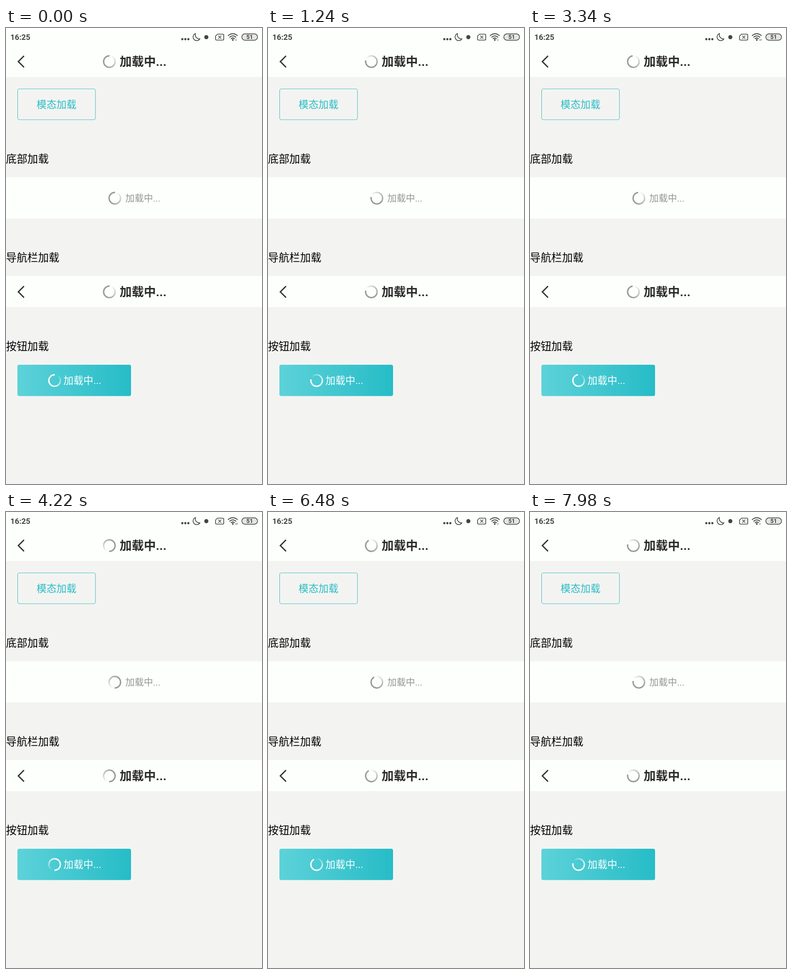
Write an HTML page that moves like this. It is 561 px wide and 998 px high and loops after 8000 ms.

```html
<!DOCTYPE html>
<html lang="zh-CN">
<head>
<meta charset="utf-8">
<title>加载</title>
<style>
  html, body { margin: 0; width: 100%; height: 100%; overflow: hidden; background: #f3f4f2; }
  #stage { position: absolute; left: 0; top: 0; width: 561px; height: 998px; }
  svg { position: absolute; left: 0; top: 0; }
  text { font-family: Roboto, "Noto Sans CJK SC", "Noto Sans CJK JP", sans-serif; }
  .line { fill: none; stroke: #444; stroke-width: 1.6; stroke-linecap: round; stroke-linejoin: round; }
  .panel { fill: #fdfffc; }
  .back { fill: none; stroke: #333; stroke-width: 2.8; }
  .heading { font-size: 26.5px; font-weight: 700; fill: #2b2b2b; }
  .label { font-size: 23.4px; }
  .button { font-size: 21.8px; }
  .ring {
    position: absolute; width: 29px; height: 29px; margin: -14.5px; border-radius: 50%;
    --ink: 154, 156, 154;
    background: conic-gradient(rgba(var(--ink), 0) 15deg, rgba(var(--ink), .6) 115deg,
      rgba(var(--ink), 1) 210deg, rgba(var(--ink), 1) 358deg, rgba(var(--ink), 0) 360deg);
    -webkit-mask: radial-gradient(circle, transparent 10.6px, #000 11.4px, #000 13.9px, transparent 14.5px);
    mask: radial-gradient(circle, transparent 10.6px, #000 11.4px, #000 13.9px, transparent 14.5px);
  }
  .ring.light { --ink: 255, 255, 255; }
</style>
</head>
<body>
<div id="stage">
  <svg width="561" height="998" viewBox="0 0 561 998">
    <defs>
      <linearGradient id="teal">
        <stop offset="0" stop-color="#5dd2d9"/>
        <stop offset="1" stop-color="#26bcc7"/>
      </linearGradient>
      <g id="nav">
        <path class="back" d="M39.5 61 L27 73.5 L39.5 86"/>
        <text class="heading" x="249" y="82.5">加载中...</text>
      </g>
    </defs>

    <rect width="561" height="998" fill="#f3f4f2"/>
    <rect class="panel" width="561" height="107"/>
    <rect class="panel" y="326.5" width="561" height="90.5"/>
    <rect class="panel" y="543" width="561" height="68"/>

    <!-- status bar -->
    <text x="9.5" y="26" font-size="17" font-weight="700" fill="#444">16:25</text>
    <g fill="#444">
      <circle cx="386.4" cy="24.5" r="2.4"/>
      <circle cx="393" cy="24.5" r="2.4"/>
      <circle cx="399.6" cy="24.5" r="2.4"/>
      <circle cx="439" cy="20" r="4.5"/>
    </g>
    <path class="line" d="M415.5 12 A8 8 0 1 0 425 23.5 A8.5 8.5 0 0 1 415.5 12 Z"/>
    <path class="line" d="M463.5 13.5 H475 Q477.2 13.5 477.2 15.7 V24.3 Q477.2 26.5 475 26.5 H461.5 Q459.3 26.5 459.3 24.3 V17.5 Z
      M465.8 17.3 l5.4 5.4 m0 -5.4 l-5.4 5.4"/>
    <g class="line" stroke-width="2" style="stroke-width:2">
      <path d="M487 16.5 Q497 8.5 507 16.5 M490.3 20 Q497 14.5 503.7 20 M493.4 23.3 Q497 20.5 500.6 23.3"/>
    </g>
    <circle cx="497" cy="26" r="1.9" fill="#444"/>
    <path d="M504 24 v4 m-1 -1.2 l1 1.2" fill="none" stroke="#555" stroke-width=".9"/>
    <path id="upload" d="M506.6 28 v-4 m1 1.2 l-1 -1.2" fill="none" stroke="#555" stroke-width=".9"/>
    <rect x="516.8" y="12.8" width="34.4" height="14" rx="7" fill="#e4e5e3" stroke="#444" stroke-width="1.5"/>
    <text x="534" y="24.4" font-size="12.5" font-weight="700" fill="#444" text-anchor="middle">51</text>

    <use href="#nav"/>
    <use href="#nav" y="504"/>

    <rect x="25.5" y="133.2" width="170.5" height="67.5" rx="4" fill="none" stroke="#52bcc3" stroke-width="1.1"/>
    <text class="button" x="110.7" y="174.5" fill="#2bbcc4" text-anchor="middle">模态加载</text>

    <text class="label" x="0" y="295.3">底部加载</text>
    <text class="label" x="0" y="511.3">导航栏加载</text>
    <text class="label" x="0" y="705.3">按钮加载</text>

    <text x="261.5" y="380.2" font-size="20.26" fill="#959795">加载中...</text>

    <rect x="25" y="737" width="249" height="68.5" rx="4" fill="url(#teal)"/>
    <text class="button" x="126" y="778.7" fill="#fff">加载中...</text>
  </svg>

  <div class="ring" style="left:226px;top:73px"></div>
  <div class="ring" style="left:238.3px;top:372px"></div>
  <div class="ring" style="left:226px;top:577px"></div>
  <div class="ring light" style="left:106px;top:771px"></div>
</div>
<script>
  const LOOP = 8000, BEAT = 840, STEPS = 18, TURN = 10;
  const rings = document.querySelectorAll('.ring');
  const upload = document.getElementById('upload');

  // Each beat ticks every 40 ms, with two short stalls near its end.
  function stepAt(t) {
    const u = t % BEAT;
    const tick = u < 600 ? Math.floor(u / 40) : u < 700 ? 15 : u < 740 ? 16 : 17;
    return Math.floor(t / BEAT) * STEPS + tick;
  }

  function draw(now) {
    const t = now % LOOP;
    const angle = 4 + TURN * stepAt(t);
    rings.forEach(ring => ring.style.transform = `rotate(${angle}deg)`);
    upload.style.visibility = t >= 2800 && t < 5500 ? 'visible' : 'hidden';
  }

  const start = performance.now();
  function frame() {
    draw(performance.now() - start);
    requestAnimationFrame(frame);
  }
  frame();
</script>
</body>
</html>
```
